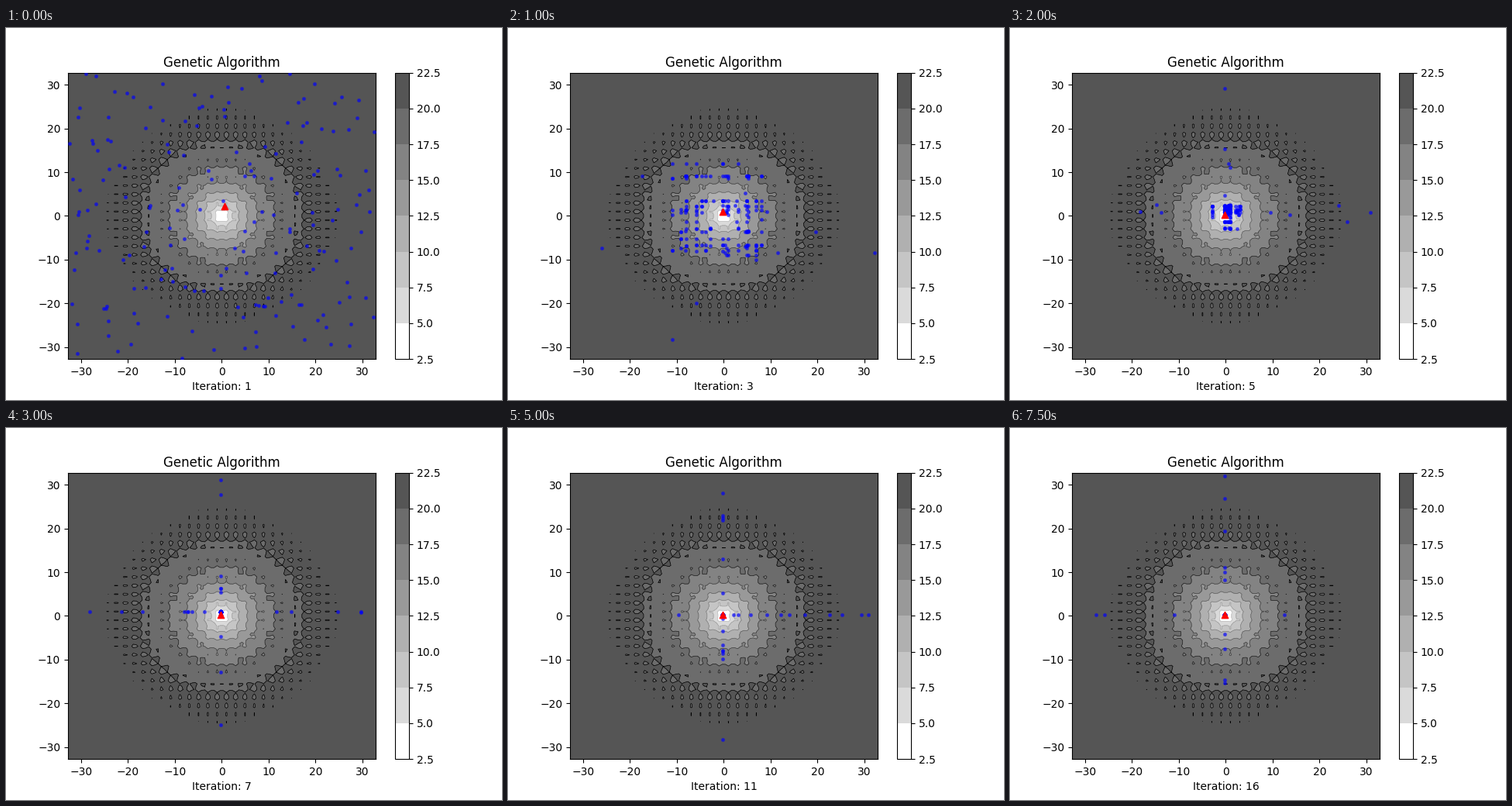
Animation, 640 px wide and 480 px high, one loop 8 s. Source, as a matplotlib script:

```python
import numpy as np
import matplotlib.pyplot as plt
from matplotlib.animation import FuncAnimation

LIMIT = 32.768
STEPS = 16
POPULATION = 180
SURVIVORS = 0.3
MUTATION = 0.1
GREYS = ["#ffffff", "#dadada", "#c5c5c5", "#b0b0b0",
         "#999999", "#838383", "#6c6c6c", "#555555"]


def ackley(x, y):
    dist = np.sqrt((x**2 + y**2) / 2)
    wave = (np.cos(2 * np.pi * x) + np.cos(2 * np.pi * y)) / 2
    return 20 + np.e - 20 * np.exp(-0.2 * dist) - np.exp(wave)


def start(rng):
    """Uniform scatter outside the basin, plus a few promising genes."""
    pool = rng.uniform(-LIMIT, LIMIT, (2 * POPULATION, 2))
    pool = pool[ackley(*pool.T) > 9]
    pool[:4] = [(0.66, 2.2), (1.0, -11.9), (-0.2, -13.6), (11.0, 0.2)]
    return pool[:POPULATION]


def evolve(pool, rng):
    """Keep the best, cross the fittest, mutate one coordinate of a few."""
    ranked = pool[np.argsort(ackley(*pool.T))]
    fit = ranked[:int(SURVIVORS * POPULATION)]
    a, b = rng.integers(len(fit), size=(2, POPULATION))
    child = np.column_stack([fit[a, 0], fit[b, 1]])
    mutants = np.flatnonzero(rng.random(POPULATION) < MUTATION)
    gene = rng.integers(2, size=len(mutants))
    child[mutants, gene] = rng.uniform(-LIMIT, LIMIT, len(mutants))
    child[0] = ranked[0]
    return child


def run(seed):
    rng = np.random.default_rng(seed)
    history = [start(rng)]
    while len(history) < STEPS:
        history.append(evolve(history[-1], rng))
    return history


fig, ax = plt.subplots(figsize=(6.4, 4.8), dpi=100)
axis = np.linspace(-LIMIT, LIMIT, 100)
X, Y = np.meshgrid(axis, axis)
Z = ackley(X, Y)
levels = np.arange(2.5, 23, 2.5)
bands = ax.contourf(X, Y, Z, levels, colors=GREYS)
ax.contour(X, Y, Z, levels, cmap="binary", vmin=0, vmax=20, linewidths=0.5)
fig.colorbar(bands, ax=ax)
ax.set(xlim=(-LIMIT, LIMIT), ylim=(-LIMIT, LIMIT))
ax.set_title("Genetic Algorithm", pad=5.4)
label = ax.set_xlabel("Iteration: 1")
dots = ax.scatter([], [], s=5, c="blue", alpha=0.5, linewidths=1.5, zorder=3)
best = ax.scatter([], [], s=36, c="red", marker="^", zorder=4)

generations = run(seed=7)


def update(i):
    pool = generations[i]
    dots.set_offsets(pool)
    best.set_offsets(pool[np.argmin(ackley(*pool.T))])
    label.set_text(f"Iteration: {i + 1}")
    return dots, best, label


anim = FuncAnimation(fig, update, frames=STEPS, interval=500,
                     repeat=True, repeat_delay=0, blit=False)
plt.show()
```
